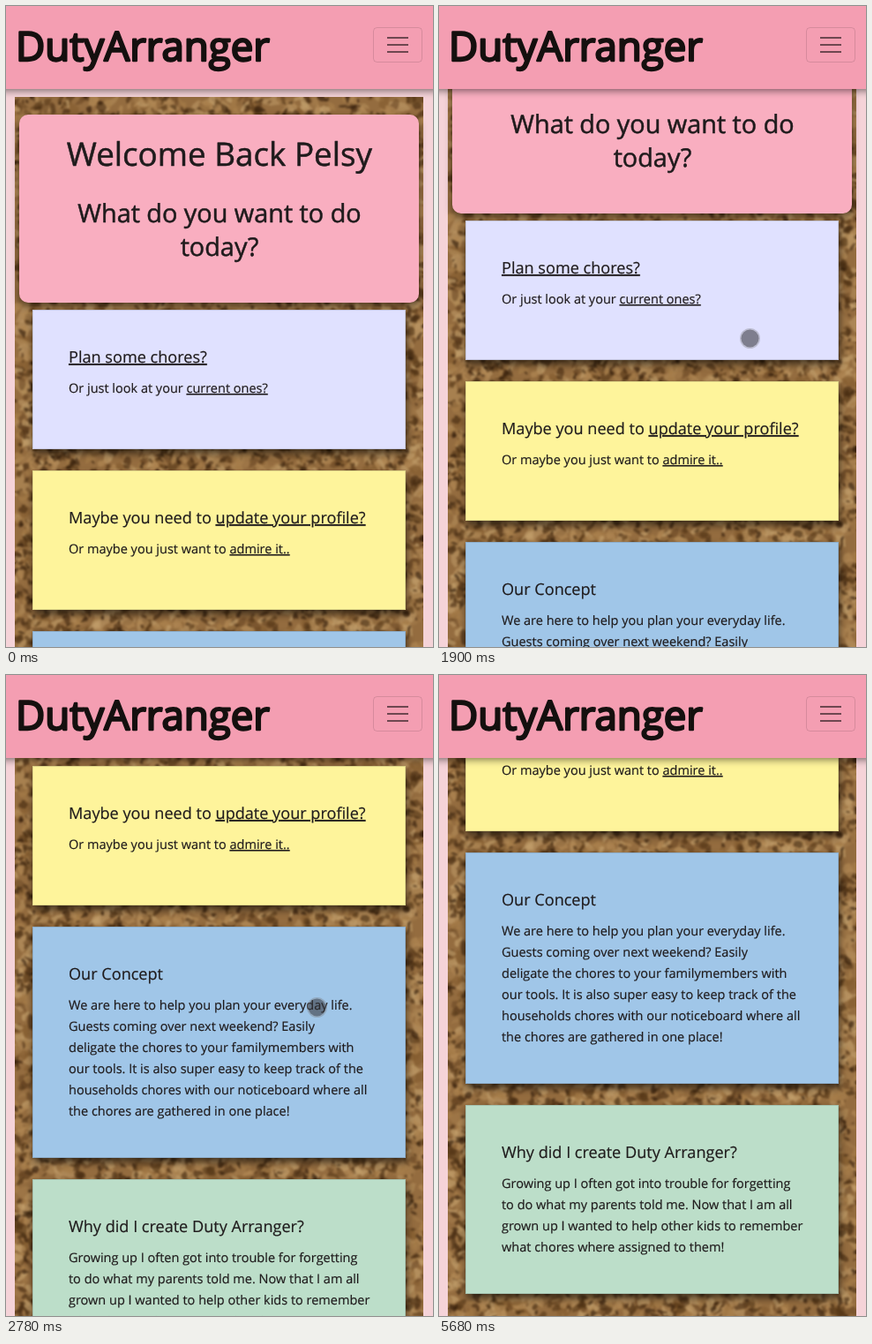
These frames come from a looping animation (484 by 726 pixels, 5.74 s). An HTML page with a canvas:

```html
<!DOCTYPE html>
<html lang="en">
<head>
<meta charset="utf-8">
<title>DutyArranger</title>
<style>
  html, body { margin: 0; width: 100%; height: 100%; overflow: hidden; background: #f5d3d8; }
  #stage { position: fixed; inset: 0; overflow: hidden; contain: strict; }
  #page, #cork, svg { position: absolute; left: 0; top: 0; display: block; }
  #page { width: 484px; height: 1260px; will-change: transform; }
  #cork { left: 10px; top: 103px; }
  text { font-family: "Open Sans", "Noto Sans", sans-serif; fill: #1f1b1c; stroke: #1f1b1c;
         stroke-width: .18px; stroke-linejoin: round; text-rendering: geometricPrecision; }
  .mid { text-anchor: middle; stroke-width: .5px; }
  .link { text-decoration: underline; }
  .card { filter: drop-shadow(1px 5px 4px rgba(0,0,0,.6)); }
  .edge { fill: none; stroke: rgba(0,0,0,.12); }
  .hero { fill: #f9aec0; filter: drop-shadow(0 4px 4px rgba(0,0,0,.5)); }
  .nav { fill: #f49eb2; filter: drop-shadow(0 2px 4px rgba(0,0,0,.5)); }
  .brand { font-size: 45.6px; fill: #15100f; stroke: #15100f; stroke-width: 2.4px; }
</style>
</head>
<body>
<div id="stage">
  <div id="page">
    <canvas id="cork" width="463" height="1157"></canvas>
    <svg id="notes" width="484" height="1260" viewBox="0 0 484 1260">
      <rect class="hero" x="15" y="123" width="453" height="213" rx="10"/>
      <text class="mid" x="242" y="181" font-size="36.8">Welcome Back Pelsy</text>
      <text class="mid" x="242" y="245" font-size="28.8">What do you want to do</text>
      <text class="mid" x="242" y="283" font-size="28.8">today?</text>
    </svg>
  </div>
  <svg width="484" height="726" viewBox="0 0 484 726">
    <rect class="nav" x="-10" y="-10" width="504" height="104"/>
    <text class="brand" x="11" y="61.5">DutyArranger</text>
    <rect x="416.5" y="24.5" width="55" height="39" rx="4" fill="none" stroke="#000" stroke-opacity=".12"/>
    <path d="M432 36h24M432 44h24M432 52h24" stroke="#000" stroke-opacity=".55" stroke-width="2"/>
    <g id="touch">
      <circle cx="352.5" cy="376.5" r="10" fill="#333338" fill-opacity=".57"/>
      <circle cx="352.5" cy="376.5" r="10.5" fill="none" stroke="#77777c" stroke-opacity=".35" stroke-width="2"/>
    </g>
  </svg>
</div>
<script>
const start = performance.now();
const LOOP = 5740;
const NS = "http://www.w3.org/2000/svg";
const byId = id => document.getElementById(id);

// Text between underscores is a link.
const CARDS = [
  { y: 344, h: 158, fill: "#e0e1ff", title: "_Plan some chores?_",
    lines: ["Or just look at your _current ones?_"] },
  { y: 526, h: 158, fill: "#fef49b", title: "Maybe you need to _update your profile?_",
    lines: ["Or maybe you just want to _admire it.._"] },
  { y: 708, h: 262, fill: "#a0c6e8", title: "Our Concept",
    lines: ["We are here to help you plan your everyday life.",
            "Guests coming over next weekend? Easily",
            "deligate the chores to your familymembers with",
            "our tools. It is also super easy to keep track of the",
            "households chores with our noticeboard where all",
            "the chores are gathered in one place!"] },
  { y: 994, h: 214, fill: "#bcdec9", title: "Why did I create Duty Arranger?",
    lines: ["Growing up I often got into trouble for forgetting",
            "to do what my parents told me. Now that I am all",
            "grown up I wanted to help other kids to remember",
            "what chores where assigned to them!"] }
];

function add(parent, tag, attrs, content = "") {
  const el = document.createElementNS(NS, tag);
  for (const key in attrs) el.setAttribute(key, attrs[key]);
  el.textContent = content;
  return parent.appendChild(el);
}

function addText(y, size, content) {
  const text = add(byId("notes"), "text", { x: 71, y, "font-size": size });
  content.split("_").forEach((part, i) => {
    if (part) text.append(i % 2 ? add(text, "tspan", { class: "link" }, part) : part);
  });
}

for (const { y, h, fill, title, lines } of CARDS) {
  add(byId("notes"), "rect", { class: "card", x: 30, y, width: 423, height: h, fill });
  add(byId("notes"), "rect", { class: "edge", x: 30.5, y: y + .5, width: 422, height: h - 1 });
  addText(y + 60, 18.1, title);
  lines.forEach((line, i) => addText(y + 94 + 24 * i, 14.5, line));
}

function drawCork(canvas) {
  const ctx = canvas.getContext("2d");
  const { width, height } = canvas;
  let seed = 71;
  const rnd = () => (seed = seed * 16807 % 2147483647) / 2147483647;

  function grains(count, min, max, colors, alpha) {
    ctx.globalAlpha = alpha;
    for (let n = 0; n < count; n++) {
      const x = rnd() * width, y = rnd() * height;
      const r = min + rnd() * (max - min), turn = rnd() * 6.28, flat = .35 + rnd() * .5;
      ctx.fillStyle = colors[Math.floor(rnd() * colors.length)];
      ctx.beginPath();
      for (let k = 0; k < 8; k++) {
        const a = k / 8 * 6.28, d = r * (.4 + rnd() * .9);
        const u = Math.cos(a) * d, v = Math.sin(a) * d * flat;
        ctx.lineTo(x + u * Math.cos(turn) - v * Math.sin(turn),
                   y + u * Math.sin(turn) + v * Math.cos(turn));
      }
      ctx.fill();
    }
  }

  ctx.fillStyle = "#946c3f";
  ctx.fillRect(0, 0, width, height);
  grains(2600, 6, 15, ["#b48d5a", "#a47c4b", "#835b2e", "#bd9865"], .6);
  grains(3600, 4, 9, ["#543516", "#6b4824", "#452a11"], .6);
  grains(3600, 4, 9, ["#c19d6a", "#b08754", "#a57c49"], .7);
  grains(2400, 2, 6, ["#331d0b", "#472c13"], .65);
  ctx.globalAlpha = 1;
  ctx.filter = "blur(0.9px)";
  ctx.drawImage(canvas, 0, 0);
}

function hermite(p0, m0, p1, m1, span, k) {
  const u = k / span, v = 1 - u;
  return p0 * v * v * (1 + 2 * u) + p1 * u * u * (3 - 2 * u)
       + span * u * v * (m0 * v - m1 * u);
}

function scrollAt(t) {
  if (t < 1630) return 0;
  if (t >= 2780) {
    const k = Math.min(3, Math.floor((t - 2780) / 70));
    return 507 - 84 * (1 - k / 3) ** 1.7;
  }
  const k = Math.min(10, Math.floor((t - 1625) / 68.7));
  if (k < 4) return hermite(1, 4, 101, 55, 4, k);
  if (k < 8) return hermite(101, 55, 338, 45, 4, k - 4);
  return hermite(338, 45, 384, 4, 2, k - 8);
}

function touchAt(t) {
  if (t < 70) return 0;
  if (t < 4930) return Math.min(1, (Math.floor((t - 70) / 70) + 1) / 4);
  return Math.max(0, 1 - (Math.floor((t - 4930) / 68.5) + 1) / 8);
}

function render(t) {
  byId("page").style.transform = `translateY(${-Math.round(scrollAt(t))}px)`;
  byId("touch").setAttribute("opacity", touchAt(t));
}

function frame() {
  render((performance.now() - start) % LOOP);
  requestAnimationFrame(frame);
}

drawCork(byId("cork"));
frame();
</script>
</body>
</html>
```
